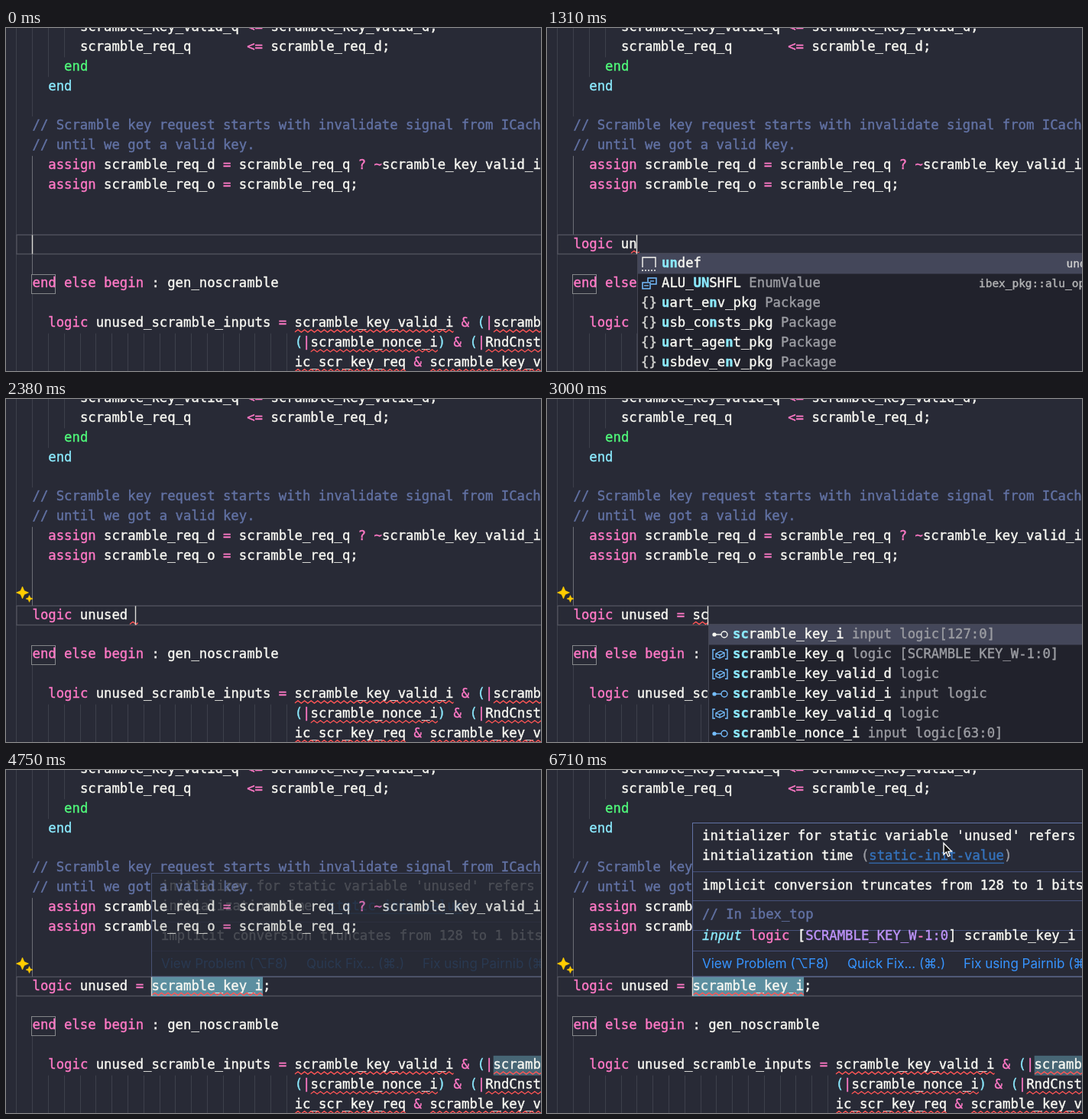
Animation of 700 by 450 pixels, one loop 6800 ms. Source, as an HTML page with a canvas:

```html
<!DOCTYPE html>
<html lang="en">
<head>
<meta charset="utf-8">
<title>Code editor</title>
<style>
html, body { margin: 0; width: 100%; height: 100%; overflow: hidden; background: #282a36; }
canvas { display: block; }
</style>
</head>
<body>
<canvas id="stage" width="700" height="450"></canvas>
<script>
const ctx = document.getElementById('stage').getContext('2d');
const LOOP = 6800, STEP = 62.5;
const CW = 10.4, LH = 25.875, LEFT = 34.5, ROW = 10;
const MONO = '"DejaVu Sans Mono", Menlo, monospace';
const SIZE = 17.28;
const C = {
  bg: '#282a36', fg: '#f8f8f2', pink: '#ff79c6', cyan: '#8be9fd', green: '#50fa7b',
  purple: '#bd93f9', note: '#6272a4', red: '#ff5555', dim: '#9b9ca2', panel: '#21222c',
  pick: '#44475a', guide: '#3d404b', blue: '#75beff', link: '#3794ff'
};

const LINES = [
  [-1, 6, 'scramble_key_valid_q <= scramble_key_valid_d;'],
  [0, 6, 'scramble_req_q       <= scramble_req_d;'],
  [1, 4, 'end', C.green],
  [2, 2, 'end', C.cyan],
  [4, 0, '// Scramble key request starts with invalidate signal from ICache', C.note],
  [5, 0, '// until we got a valid key.', C.note],
  [6, 2, 'assign scramble_req_d = scramble_req_q ? ~scramble_key_valid_i'],
  [7, 2, 'assign scramble_req_o = scramble_req_q;'],
  [12, 0, 'end else begin : gen_noscramble'],
  [14, 2, 'logic unused_scramble_inputs = scramble_key_valid_i & (|scramble_key_i) &'],
  [15, 33, '(|scramble_nonce_i) & (|RndCnstKey)'],
  [16, 33, 'ic_scr_key_req & scramble_key_valid_q']
];

// [row, first column, length] of lasting warnings
const WARN = [[14, 33, 20], [14, 58, 14], [15, 35, 16], [15, 57, 10], [16, 33, 14], [16, 50, 20]];

// [time, text on the edited line]
const TYPED = [
  [0, ''], [120, 'l'], [240, 'lo'], [310, 'log'], [430, 'logi'], [560, 'logic'], [690, 'logic '],
  [1000, 'logic u'], [1180, 'logic un'], [1440, 'logic unu'], [1560, 'logic unus'],
  [1740, 'logic unuse'], [1870, 'logic unused'], [2180, 'logic unused '],
  [2430, 'logic unused ='], [2620, 'logic unused = '], [2810, 'logic unused = s'],
  [3000, 'logic unused = sc'], [3180, 'logic unused = scr'], [3370, 'logic unused = scra'],
  [3740, 'logic unused = scramble_key_i'], [4050, 'logic unused = scramble_key_i;']
];

// [icon, label, kind, right-hand note]
const MENUS = [
  { from: 180, to: 620, items: [
    ['box', 'logic', '', 'logic'], ['box', 'longint', '', 'longint'],
    ['{}', 'sw_logger_if', 'Interface'], ['{}', 'lc_ctrl_prog_failure_vseq', 'Symbol'],
    ['{}', 'lc_ctrl_prog_failure_vseq', 'Symbol'], ['{}', 'lc_ctrl_sec_token_digest_vseq', 'Symbol']] },
  { from: 1060, to: 1500, items: [
    ['box', 'undef', '', 'undef'], ['enum', 'ALU_UNSHFL', 'EnumValue', 'ibex_pkg::alu_op_e'],
    ['{}', 'uart_env_pkg', 'Package'], ['{}', 'usb_consts_pkg', 'Package'],
    ['{}', 'uart_agent_pkg', 'Package'], ['{}', 'usbdev_env_pkg', 'Package']] },
  { from: 2870, to: 3740, items: [
    ['port', 'scramble_key_i', 'input logic[127:0]'], ['cube', 'scramble_key_q', 'logic [SCRAMBLE_KEY_W-1:0]'],
    ['cube', 'scramble_key_valid_d', 'logic'], ['port', 'scramble_key_valid_i', 'input logic'],
    ['cube', 'scramble_key_valid_q', 'logic'], ['port', 'scramble_nonce_i', 'input logic[63:0]']] }
];

const colX = c => LEFT + c * CW;
const rowTop = r => 271.3 + (r - ROW) * LH;
const baseY = r => 289.4 + (r - ROW) * LH;

function rect(x, y, w, h, color) {
  ctx.fillStyle = color;
  ctx.fillRect(x, y, w, h);
}

// A hairline stroke gives the letters their heavier screen weight
function put(s, x, y, color, style = '', size = SIZE) {
  ctx.font = `${style} ${size}px ${MONO}`;
  ctx.fillStyle = ctx.strokeStyle = color;
  ctx.lineWidth = 0.4;
  ctx.fillText(s, x, y - 0.9);
  ctx.strokeText(s, x, y - 0.9);
  return x + ctx.measureText(s).width;
}

function putAll(parts, x, y) {
  for (const [s, color, style] of parts) x = put(s, x, y, color, style);
  return x;
}

function code(s, x, y, color) {
  if (color) return put(s, x, y, color);
  const parts = s.split(/(\b(?:assign|logic|else|begin|end)\b|[=<?~&|]+|[()])/);
  putAll(parts.map((p, i) => [p, i % 2 ? (/[()]/.test(p) ? C.cyan : C.pink) : C.fg]), x, y);
}

function path(points, color, width, closed, fill) {
  ctx.beginPath();
  points.forEach(([x, y]) => ctx.lineTo(x, y));
  if (closed) ctx.closePath();
  if (fill) { ctx.fillStyle = fill; ctx.fill(); }
  if (color) { ctx.strokeStyle = color; ctx.lineWidth = width; ctx.stroke(); }
}

function frame(x, y, w, h, color, width = 1) {
  ctx.strokeStyle = color;
  ctx.lineWidth = width;
  ctx.strokeRect(x, y, w, h);
}

function squiggle(x, y, w) {
  ctx.save();
  ctx.beginPath();
  ctx.rect(x, y - 4, w, 8);
  ctx.clip();
  const pts = [];
  for (let i = 0; i * 4.3 <= w + 5; i++) pts.push([x + i * 4.3, y + (i % 2 ? -1.6 : 1.6)]);
  path(pts, C.red, 1.3);
  ctx.restore();
}

const warn = (r, c, n) => squiggle(colX(c), rowTop(r) + 22.7, n * CW);

function guide(c, from, to, color = C.guide) {
  const top = rowTop(from);
  rect(Math.round(colX(c) - 0.4), top, 1, rowTop(to) - top, color);
}

function star(x, y, r) {
  const pts = [];
  for (let i = 0; i < 8; i++) {
    const a = i * Math.PI / 4, d = i % 2 ? r * 0.42 : r;
    pts.push([x + d * Math.sin(a), y - d * Math.cos(a)]);
  }
  path(pts, '#ffcc00', 0.6, true, '#ffcc00');
}

function ring(x, y, r, color, full) {
  ctx.beginPath();
  ctx.arc(x, y, r, 0, 7);
  ctx.lineWidth = 1.4;
  ctx.strokeStyle = ctx.fillStyle = color;
  full ? ctx.fill() : ctx.stroke();
}

function icon(kind, x, y, picked) {
  const tint = picked ? C.fg : C.blue;
  if (kind === '{}') {
    put('{}', x - 1, y + 6, '#d5d5d2');
  } else if (kind === 'box') {
    path([[x + 1, y + 5], [x + 1, y - 8], [x + 18, y - 8], [x + 18, y + 5]], C.fg, 1.4);
    ctx.setLineDash([2, 2]);
    path([[x, y + 9], [x + 19, y + 9]], C.fg, 1.6);
    ctx.setLineDash([]);
  } else if (kind === 'enum') {
    frame(x + 8, y - 7, 11, 8, C.blue, 1.5);
    rect(x, y - 2, 12, 10, C.panel);
    frame(x + 1, y - 1, 10, 8, C.blue, 1.5);
    path([[x + 3, y + 3], [x + 9, y + 3]], C.blue, 1.3);
    path([[x + 11, y - 3], [x + 16, y - 3]], C.blue, 1.3);
  } else if (kind === 'port') {
    ring(x + 2, y, 2.6, tint, true);
    path([[x + 2, y], [x + 11, y]], tint, 1.4);
    ring(x + 15, y, 4, tint);
  } else {
    path([[x + 3, y - 6], [x, y - 6], [x, y + 6], [x + 3, y + 6]], C.blue, 1.4);
    path([[x + 16, y - 6], [x + 19, y - 6], [x + 19, y + 6], [x + 16, y + 6]], C.blue, 1.4);
    path([[x + 4, y - 1], [x + 10, y - 4], [x + 15, y - 2], [x + 15, y + 2], [x + 9, y + 5], [x + 4, y + 3]], C.blue, 1.3, true);
    path([[x + 4, y - 1], [x + 9, y + 1], [x + 15, y - 2]], C.blue, 1.2);
    path([[x + 9, y + 1], [x + 9, y + 5]], C.blue, 1.2);
  }
}

// Indices of the typed letters inside a label
function hits(label, word) {
  const text = label.toLowerCase(), whole = text.indexOf(word), found = new Set();
  let at = whole < 0 ? 0 : whole;
  for (const ch of word) {
    let i = text.indexOf(ch, at);
    if (i < 0) i = text.lastIndexOf(ch);
    if (i < 0) continue;
    found.add(i);
    at = i + 1;
  }
  return found;
}

function menu(items, x, word) {
  const top = 296, w = 621;
  rect(x, top, w, 170, C.panel);
  items.forEach(([kind, label, type, note], i) => {
    const y = 309 + i * 26, picked = i === 0;
    if (picked) rect(x, top, w, 26.5, C.pick);
    icon(kind, x + 6, y, picked);
    const found = hits(label, word);
    const end = putAll([...label].map((ch, j) => found.has(j) ? [ch, C.cyan, 'bold'] : [ch, C.fg]), x + 32, y + 6);
    if (type) put(type, end + CW, y + 6, C.dim);
    if (note) {
      const short = note.length * 8.7;
      const nx = note.length > 9 ? x + 447 : x + 605 - short;
      put(note, nx, y + 6, picked ? '#d0d0cf' : '#b4b5b6', '', 14.45);
    }
  });
  rect(x + w - 15, top, 14, 129, 'rgba(100,101,110,.65)');
  frame(x + 0.5, top - 0.5, w, 171, '#454754');
}

function action(s, x) {
  ctx.font = '17px Inter, "Noto Sans", "DejaVu Sans", sans-serif';
  ctx.fillStyle = C.link;
  ctx.fillText(s, x, 260);
}

function hover(alpha, full) {
  const top = full ? 69.5 : 135.5, x = 203, rule = y => rect(190, y, 510, 1, '#46517a');
  ctx.save();
  ctx.globalAlpha = alpha;
  rect(190, top, 520, 271 - top, C.bg);
  put("initializer for static variable 'unused' refers to", x, top + 23.5, C.fg);
  const open = putAll([['initialization time ', C.fg], ['(', C.dim]], x, top + 49.5);
  const end = put('static-init-value', open, top + 49.5, '#3573bd');
  rect(open, top + 52, end - open, 1.2, '#3573bd');
  put(')', end, top + 49.5, C.dim);
  rule(top + 63.5);
  put('implicit conversion truncates from 128 to 1 bits', x, top + 88.5, C.fg);
  if (full) {
    rule(171);
    put('// In ibex_top', x, 196, C.note);
    rule(210);
    putAll([['input', C.cyan, 'italic'], [' logic', C.pink], [' [', C.fg], ['SCRAMBLE_KEY_W', C.purple],
      ['-', C.pink], ['1:0', C.purple], ['] scramble_key_i', C.fg]], x, 224);
  }
  rule(237);
  action('View Problem (⌥F8)', x);
  action('Quick Fix... (⌘.)', 393);
  action('Fix using Pairnib (⌘I)', 545);
  ctx.globalAlpha = Math.min(1, alpha * 4);
  frame(190.5, top, 520, 271 - top, C.note);
  ctx.restore();
}

function pointer(t) {
  const p = Math.min(1, (t - 5437) / 1250), e = p * p * (3 - 2 * p);
  const x = 290 + 229 * e, y = 262 - 166 * e;
  const shape = [[0, 0], [0, 15], [3.4, 11.8], [5.8, 17.4], [8.2, 16.4], [5.9, 11], [10.4, 10.6]];
  path(shape.map(([a, b]) => [x + a, y + b]), '#fff', 1.4, true, '#111');
}

function draw(time) {
  const t = Math.floor((time + 5) / STEP) * STEP;
  const text = TYPED.filter(k => t + 5 >= k[0]).pop()[1];
  const marked = t >= 4437;
  rect(0, 0, 700, 450, C.bg);

  rect(13, 0, 1, 450, C.guide);
  guide(0, -1, 4);
  guide(2, -1, 2);
  guide(4, -1, 1);
  guide(0, 6, text ? 10 : 12, '#6b6d76');
  guide(0, 13, 18);
  for (let c = 2; c <= 32; c += 2) guide(c, 15, 18);

  frame(13.9, 271.4, 700, 25.1, '#50525d', 1.4);
  if (marked) {
    const tint = 'rgba(139,233,253,.314)';
    rect(colX(15), 271.5, 14 * CW, 25.5, tint);
    rect(colX(15), 271.5, 14 * CW, 25.5, tint);
    rect(colX(58), rowTop(14), 14 * CW, LH, tint);
  }
  frame(33.5, 323.5, 31, 25, '#85878a');

  for (const [r, c, s, color] of LINES) code(s, colX(c), baseY(r), color);
  for (const w of WARN) warn(...w);

  code(text, LEFT, baseY(ROW));
  const n = text.length;
  if (n > 0 && n < 6) squiggle(34, rowTop(12) + 22.7, 9);
  if (n > 6 && n < 14) squiggle(colX(n) - 8, 294, 11);
  if (n > 15) warn(ROW, 15, Math.min(n, 29) - 15);
  if (t >= 1900) {
    star(21.5, 254, 8);
    star(30.5, 262, 4.5);
  }

  const caret = colX(marked ? 15 : n);
  rect(Math.round(caret) - 1.2, 271.5, 1.4, 25, '#dcdcd8');

  const open = MENUS.find(m => t >= m.from && t < m.to);
  if (open) menu(open.items, Math.round(caret), text.split(' ').pop());

  if (t >= 4750) hover(t < 4800 ? 0.14 : t < 4870 ? 0.75 : 1, t >= 5000);
  if (t >= 5437) pointer(t);
}

const start = performance.now();
function tick() {
  draw((performance.now() - start) % LOOP);
  requestAnimationFrame(tick);
}
tick();
</script>
</body>
</html>
```
